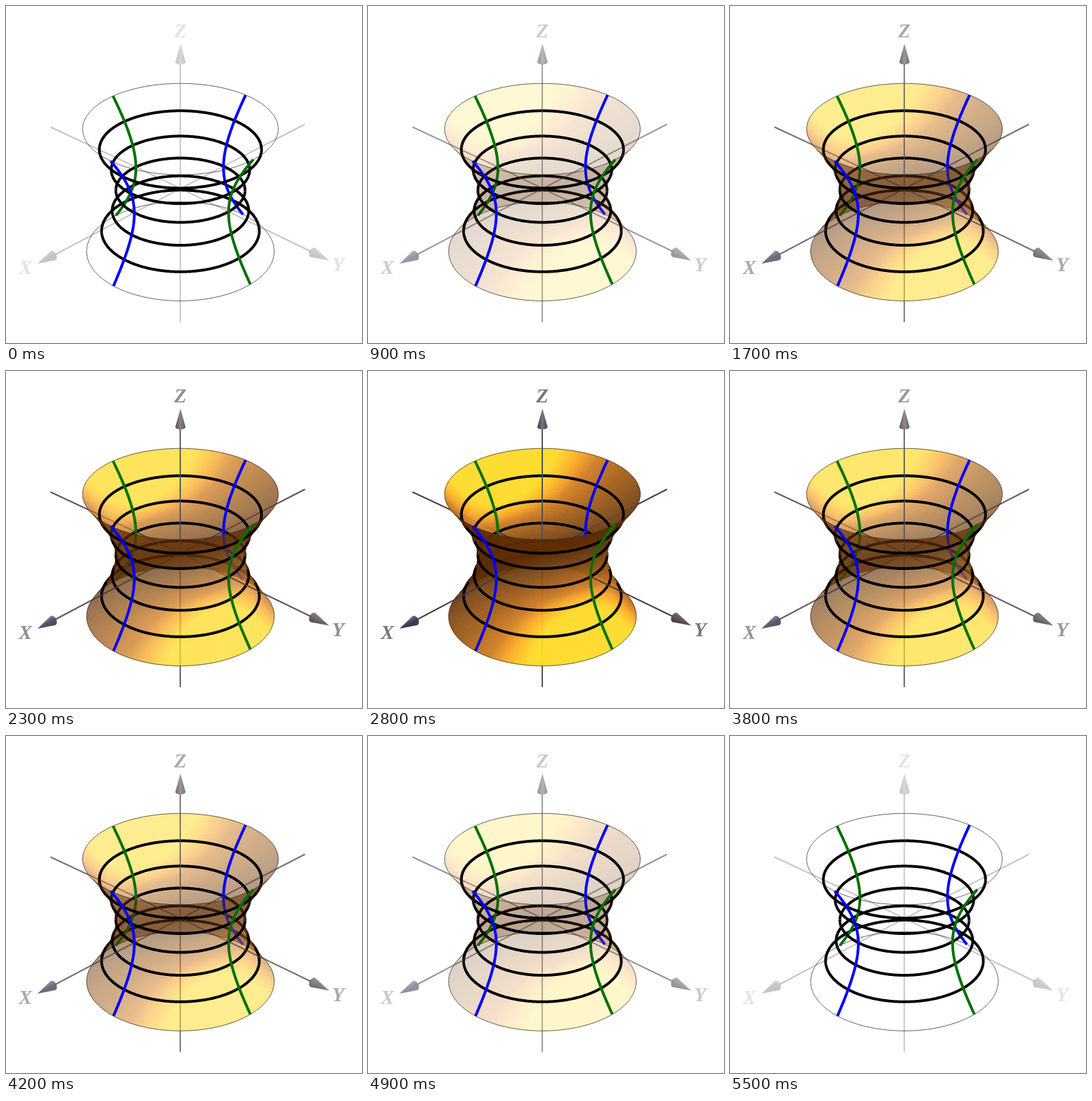
An HTML page with a canvas for the animation above (6 s loop, 521 px wide and 493 px high).

```html
<!DOCTYPE html>
<html lang="en">
<head>
<meta charset="utf-8">
<title>Hyperboloid</title>
<style>
  html, body { margin: 0; width: 100%; height: 100%; overflow: hidden; background: #fff; }
  canvas { display: block; }
</style>
</head>
<body>
<canvas id="stage" width="521" height="493"></canvas>
<script>
const W = 521, H = 493, CX = 255.3, CY = 269.5, RAD = Math.PI / 180;
const ctx = document.getElementById('stage').getContext('2d');

// Surface: k is the height in ring units (-3..3), a the angle in degrees
const radius = k => Math.sqrt(8930 + 1190 * k * k);
const slope = k => 34.5 * k / radius(k);
const isFront = (k, a) => Math.sin(a * RAD) > 0.577 * slope(k);

function project(k, a) {
  const rx = radius(k) * (1 + 0.007 * k), ry = rx * (0.4975 - 0.0102 * k);
  return [CX + rx * Math.cos(a * RAD), CY - 29.8 * k + ry * Math.sin(a * RAD)];
}

const ramp = [
  [0, 97, 45, 2], [0.15, 112, 65, 23], [0.5, 166, 97, 25],
  [0.67, 207, 124, 35], [0.75, 249, 166, 35], [0.84, 255, 220, 41]
];

function shade(k, a, front) {
  const side = front ? 1 : -1, m = slope(k), len = side / Math.hypot(1, m);
  const x = Math.cos(a * RAD) * len, depth = Math.sin(a * RAD) * len, up = -m * len;
  const y = 0.866 * up - 0.5 * depth, z = 0.866 * depth + 0.5 * up;
  const light = Math.min(0.839, Math.max(0, 0.3 * x + 0.46 * y + 0.836 * z));
  const i = ramp.findIndex(stop => stop[0] > light);
  const lo = ramp[i - 1], hi = ramp[i], f = (light - lo[0]) / (hi[0] - lo[0]);
  return `rgb(${[1, 2, 3].map(c => Math.round(lo[c] + (hi[c] - lo[c]) * f))})`;
}

// Opaque picture of one side of the surface, faded in later
function surfaceLayer(front) {
  const layer = document.createElement('canvas');
  layer.width = W;
  layer.height = H;
  const g = layer.getContext('2d'), dk = 0.1, da = 2;
  g.lineWidth = 0.7;
  for (let row = 0; row < 60; row++) {
    const k = -3 + row * dk;
    for (let a = 0; a < 360; a += da) {
      if (isFront(k + dk / 2, a + da / 2) !== front) continue;
      g.fillStyle = g.strokeStyle = shade(k + dk / 2, a + da / 2, front);
      g.beginPath();
      g.lineTo(...project(k, a));
      g.lineTo(...project(k, a + da));
      g.lineTo(...project(k + dk, a + da));
      g.lineTo(...project(k + dk, a));
      g.closePath();
      g.fill();
      g.stroke();
    }
  }
  return layer;
}

const backLayer = surfaceLayer(false), frontLayer = surfaceLayer(true);
const meridians = [
  { angle: 135.6, color: '#00f' }, { angle: -48.2, color: '#00f' },
  { angle: 41.8, color: '#007000' }, { angle: -133.6, color: '#007000' }
];

function drawCurves(front) {
  for (let k = -3; k <= 3; k++) {
    const rim = Math.abs(k) === 3;
    ctx.strokeStyle = rim ? '#333' : '#000';
    ctx.lineWidth = rim ? 0.8 : 4;
    ctx.beginPath();
    let pen = false;
    for (let a = 0; a <= 360; a++) {
      const p = project(k, a), visible = isFront(k, a) === front;
      if (visible || pen) pen ? ctx.lineTo(...p) : ctx.moveTo(...p);
      pen = visible;
    }
    ctx.stroke();
  }
  ctx.lineWidth = 4;
  for (const { angle, color } of meridians) {
    if (isFront(0, angle) !== front) continue;
    ctx.strokeStyle = color;
    ctx.beginPath();
    for (let k = -3; k < 3.05; k += 0.1) ctx.lineTo(...project(k, angle));
    ctx.stroke();
  }
}

function line(from, to, color = '#483c3c') {
  ctx.strokeStyle = color;
  ctx.lineWidth = 2;
  ctx.beginPath();
  ctx.moveTo(...from);
  ctx.lineTo(...to);
  ctx.stroke();
}

function cone(tip, base, bulge, colors) {
  const dx = tip[0] - base[0], dy = tip[1] - base[1], len = Math.hypot(dx, dy), w = 7.5;
  ctx.save();
  ctx.translate(...base);
  ctx.rotate(Math.atan2(dy, dx));
  const fill = ctx.createLinearGradient(0, -w, 0, w);
  colors.forEach((c, i) => fill.addColorStop(i / (colors.length - 1), c));
  ctx.fillStyle = fill;
  ctx.beginPath();
  ctx.moveTo(len, 0);
  ctx.lineTo(0, w);
  ctx.ellipse(0, 0, bulge, w, 0, Math.PI / 2, Math.PI * 1.5);
  ctx.closePath();
  ctx.fill();
  ctx.restore();
}

const xFront = project(0, 135.6), xBack = project(0, -48.2);
const yFront = project(0, 41.8), yBack = project(0, -133.6);

function draw(fade) {
  const axisAlpha = 0.3 + 0.7 * fade ** 0.7;
  const withAlpha = (alpha, paint) => {
    ctx.globalAlpha = alpha;
    paint();
    ctx.globalAlpha = 1;
  };
  ctx.fillStyle = '#fff';
  ctx.fillRect(0, 0, W, H);

  withAlpha(axisAlpha, () => {
    line([437.5, 173], xBack);
    line([65, 177], yBack);
  });
  withAlpha(fade, () => ctx.drawImage(backLayer, 0, 0));
  drawCurves(false);
  withAlpha(axisAlpha, () => {
    line(xBack, xFront);
    line(yBack, yFront);
    line([255, 85], [255, 462.5], '#505054');
  });
  withAlpha(fade, () => ctx.drawImage(frontLayer, 0, 0));
  drawCurves(true);
  withAlpha(axisAlpha, () => {
    line(xFront, [73, 363]);
    line(yFront, [446, 359]);
    cone([255.3, 55], [255.3, 82], 3.5, ['#4a3034', '#77737a', '#38415a']);
    cone([46, 377], [69, 365], 5, ['#4a3034', '#2f3a5c', '#77706f']);
    cone([473, 372.5], [449, 360.5], 5, ['#756c6c', '#5a5056', '#3c3038']);
  });
  withAlpha(0.2 + 0.8 * fade, () => {
    ctx.fillStyle = '#737373';
    ctx.font = 'italic bold 29px "Liberation Serif", serif';
    ctx.textAlign = 'center';
    ctx.fillText('Z', 255, 46);
    ctx.fillText('X', 28.5, 392);
    ctx.fillText('Y', 486, 388);
  });
}

// Opacity rises in 25 steps of 100 ms, holds, then falls the same way
function fadeAt(t) {
  const rise = Math.floor((t - 400) / 100), fall = 24 - Math.floor((t - 3100) / 100);
  return Math.max(0, Math.min(25, rise, fall)) / 25;
}

const start = performance.now();
function tick() {
  draw(fadeAt((performance.now() - start) % 6000));
  requestAnimationFrame(tick);
}
tick();
</script>
</body>
</html>
```
